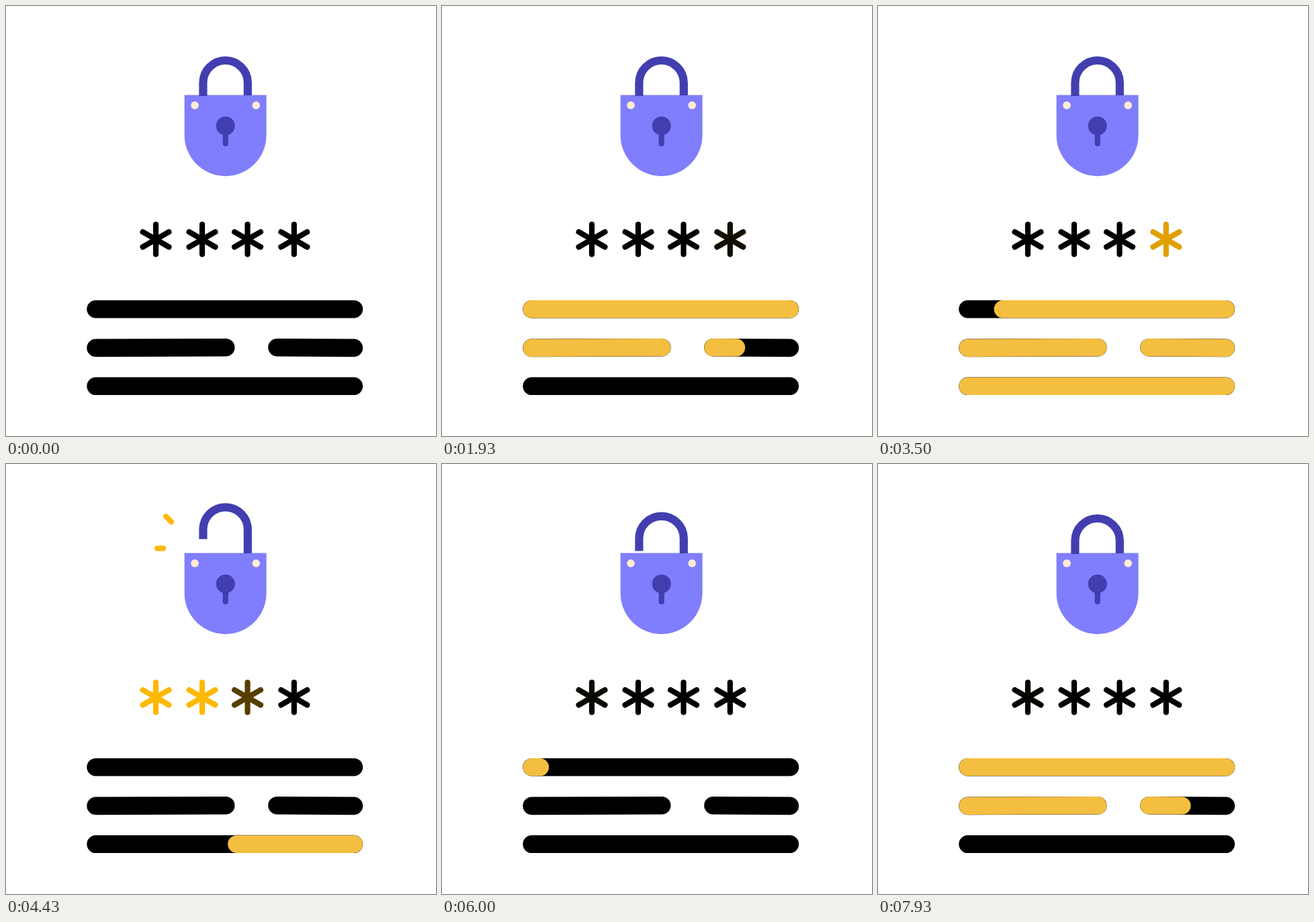
Write an HTML page with a canvas that moves like this. It is 640 by 640 pixels and loops after 8000 ms.

```html
<!DOCTYPE html>
<html lang="en">
<head>
<meta charset="utf-8">
<title>Password unlock</title>
<style>
  html, body { margin: 0; width: 100%; height: 100%; overflow: hidden; background: #fff; }
  canvas { display: block; width: 100vmin; height: 100vmin; margin: auto; }
</style>
</head>
<body>
<canvas width="640" height="640"></canvas>
<script>
const ctx = document.querySelector('canvas').getContext('2d');

const LOOP = 8000, STEP = LOOP / 112, CYCLE = 5955;
const BLACK = '#000', GOLD = [255, 184, 0], AMBER = '#f4be40';
const INDIGO = '#433eb0', VIOLET = '#807efc', CREAM = '#fdecd2';

// Bars as [x1, y1, x2, y2], filled and emptied one after another.
const BARS = [
  [133.6, 451.2, 517.8, 451.2],
  [133.6, 508.9, 327.2, 508.2],
  [403.4, 508.2, 517.8, 508.9],
  [133.6, 565.8, 517.8, 565.8]
];
const STARS = [223, 292, 359.5, 428.8];

const clamp = (v, lo = 0, hi = 1) => Math.min(hi, Math.max(lo, v));
const mix = (a, b, k) => a + (b - a) * k;
const ease = k => (1 - Math.cos(Math.PI * clamp(k))) / 2;
const ramp = (t, start, duration) => ease((t - start) / duration);
const pulse = (t, start) => ramp(t, start, 350) - ramp(t, start + 350, 350);

function line(x1, y1, x2, y2, width, color) {
  ctx.beginPath();
  ctx.moveTo(x1, y1);
  ctx.lineTo(x2, y2);
  ctx.lineWidth = width;
  ctx.lineCap = 'round';
  ctx.strokeStyle = color;
  ctx.stroke();
}

function dot(x, y, r, color) {
  ctx.beginPath();
  ctx.arc(x, y, r, 0, Math.PI * 2);
  ctx.fillStyle = color;
  ctx.fill();
}

// Draws the part of a segment between the fractions a and b.
function trimmed([x1, y1, x2, y2], a, b, width, color) {
  if (a < b) line(mix(x1, x2, a), mix(y1, y2, a), mix(x1, x2, b), mix(y1, y2, b), width, color);
}

function drawLock(open) {
  ctx.beginPath();
  ctx.moveTo(265.6, 132.5);
  ctx.lineTo(387.6, 132.5);
  ctx.lineTo(387.6, 192.2);
  ctx.arc(326.6, 192.2, 61, 0, Math.PI);
  ctx.closePath();
  ctx.fillStyle = VIOLET;
  ctx.fill();

  const arcY = 114.2 - 17.3 * open;
  ctx.beginPath();
  ctx.moveTo(293.4, 134 - 23 * open);
  ctx.lineTo(293.4, arcY);
  ctx.arc(326.6, arcY, 33.2, Math.PI, 0);
  ctx.lineTo(359.8, 133);
  ctx.lineWidth = 12.2;
  ctx.lineCap = 'butt';
  ctx.strokeStyle = INDIGO;
  ctx.stroke();

  dot(281, 147.8, 5.8, CREAM);
  dot(372.2, 147.8, 5.8, CREAM);
  dot(326.7, 178.4, 14, INDIGO);
  line(326.7, 180, 326.7, 204.8, 8.2, INDIGO);
}

function drawSparks(t) {
  const head = ramp(t, 4100, 330), tail = ramp(t, 4290, 280);
  const color = `rgb(${GOLD})`;
  trimmed([254, 94, 238, 78], tail, head, 8, color);
  trimmed([243, 125.6, 225, 125.6], tail, head, 8, color);
}

function drawStar(x, glow) {
  const y = 347.4, color = `rgb(${GOLD.map(c => Math.round(c * glow))})`;
  line(x, y - 22.2, x, y + 22.2, 8.2, color);
  line(x - 19.4, y - 11.2, x + 19.4, y + 11.2, 8.2, color);
  line(x - 19.4, y + 11.2, x + 19.4, y - 11.2, 8.2, color);
}

function drawBars(t) {
  const head = (t - 6) * 0.3186, tail = (t - 3443) * 0.915;
  let start = 0;
  for (const bar of BARS) {
    const length = bar[2] - bar[0];
    const part = distance => clamp((distance - start) / length);
    line(...bar, 26.6, BLACK);
    trimmed(bar, part(tail), part(head), 26.2, AMBER);
    start += length;
  }
}

function draw(time) {
  const t = time % CYCLE;
  ctx.fillStyle = '#fff';
  ctx.fillRect(0, 0, 640, 640);

  // The shackle is still closing when the next cycle begins.
  drawLock(ramp(time, 3900, 600) - ramp(time, 5753, 350));
  drawSparks(t);
  STARS.forEach((x, i) => {
    const typing = pulse(t, i * 430) + pulse(t, 1940 + i * 430);
    const accepted = ramp(t, 3890 + i * 200, 350) - ramp(t, 5400, 350);
    drawStar(x, clamp(typing + accepted));
  });
  drawBars(t);
}

const origin = performance.now();
function tick() {
  const elapsed = (performance.now() - origin) % LOOP;
  draw(Math.floor((elapsed + 3) / STEP) * STEP % LOOP);
  requestAnimationFrame(tick);
}
tick();
</script>
</body>
</html>
```
